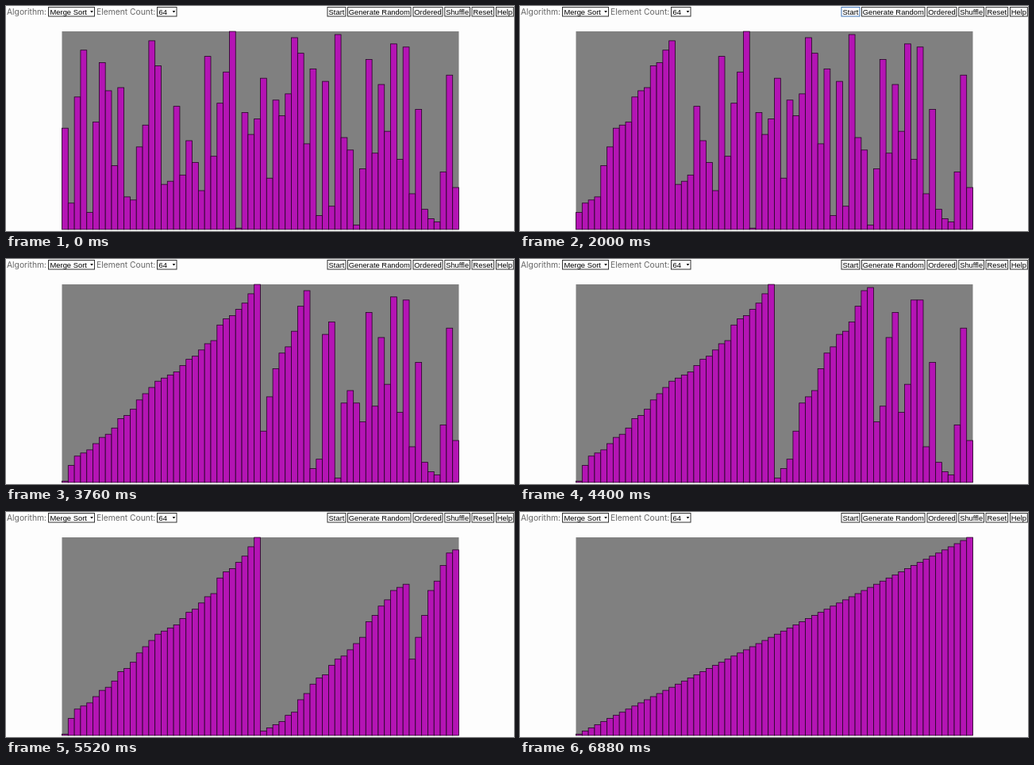
An HTML page that plays this animation: 640x284 px, repeating every 7920 ms.

```html
<!DOCTYPE html>
<html lang="en">
<head>
<meta charset="utf-8">
<title>Merge Sort</title>
<style>
html, body { margin: 0; width: 100%; height: 100%; overflow: hidden; background: #fdfdfd; }
svg { display: block; width: 640px; height: 284px; }
text { font: 9.4px "Liberation Sans", Arial, sans-serif; fill: #000; }
.label { font: 10.3px Inter, sans-serif; fill: #666; }
.box { fill: #fff; stroke: #333; stroke-width: 1; }
.focus { stroke: #3f74b8; }
#bars rect { fill: #b414b4; stroke: #240424; stroke-width: .8; }
</style>
</head>
<body>
<svg viewBox="0 0 640 284">
  <g id="header">
    <text class="label" x="1" y="10.5">Algorithm:</text>
    <text class="label" x="114" y="10.5">Element Count:</text>
  </g>
  <rect x="70.5" y="32" width="500" height="250" fill="#808080"/>
  <g id="bars"></g>
</svg>
<script>
const LOOP = 7920, FRAME = 80, BASE = 282, BAR = 500 / 64;
const values = [
  32, 8, 42, 57, 5, 34, 53, 44, 20, 45, 10, 9, 26, 33, 60, 52,
  14, 15, 39, 17, 28, 21, 12, 55, 23, 40, 50, 63, 0, 37, 30, 35,
  48, 16, 41, 36, 43, 61, 56, 27, 51, 4, 47, 7, 62, 29, 25, 1,
  19, 54, 24, 46, 31, 59, 22, 58, 11, 38, 6, 3, 2, 18, 49, 13];
// [time in ms, array writes done]
const pace = [[1120, 0], [2000, 72], [2480, 101], [3040, 146], [3760, 199],
  [4080, 217], [4240, 229], [5040, 281], [6000, 342], [6560, 384]];

const header = document.getElementById('header');
const barGroup = document.getElementById('bars');

function add(parent, tag, attrs, text = '') {
  const el = document.createElementNS('http://www.w3.org/2000/svg', tag);
  for (const key in attrs) el.setAttribute(key, attrs[key]);
  el.textContent = text;
  return parent.appendChild(el);
}

function box(left, right) {
  return add(header, 'rect', { class: 'box', x: left, y: 1.5, width: right - left, height: 11.5 });
}

function button(left, right, label) {
  const rect = box(left, right);
  add(header, 'text', { x: (left + right) / 2, y: 10.5, 'text-anchor': 'middle' }, label);
  return rect;
}

function select(left, right, label) {
  box(left, right);
  add(header, 'text', { x: left + 2, y: 10.5 }, label);
  add(header, 'path', { d: `M${right - 5.3} 6h3.6l-1.8 2.6z` });
}

select(53.5, 111.5, 'Merge Sort');
select(190.5, 215, '64');
const start = button(405, 428, 'Start');
button(430.5, 510, 'Generate Random');
button(513, 550, 'Ordered');
button(552.8, 584.5, 'Shuffle');
button(587, 614.7, 'Reset');
button(617.5, 639.3, 'Help');

const bars = values.map((_, i) => add(barGroup, 'rect', { x: 70.5 + i * BAR, width: BAR }));

// Sort a copy, logging every write
const writes = [];
function mergeSort(a, lo, hi) {
  if (hi - lo < 2) return;
  const mid = (lo + hi) / 2;
  mergeSort(a, lo, mid);
  mergeSort(a, mid, hi);
  const left = a.slice(lo, mid), right = a.slice(mid, hi);
  for (let k = lo; k < hi; k++) {
    const takeLeft = !right.length || left[0] < right[0];
    a[k] = (takeLeft ? left : right).shift();
    writes.push([k, a[k]]);
  }
}
mergeSort([...values], 0, values.length);

function writesAt(t) {
  if (t <= pace[0][0]) return 0;
  const i = pace.findIndex(p => p[0] >= t);
  if (i < 0) return writes.length;
  const [t0, n0] = pace[i - 1], [t1, n1] = pace[i];
  return Math.round(n0 + (n1 - n0) * (t - t0) / (t1 - t0));
}

function draw(now) {
  const t = Math.floor(now % LOOP / FRAME) * FRAME;
  const state = [...values];
  for (const [k, v] of writes.slice(0, writesAt(t))) state[k] = v;
  state.forEach((v, i) => {
    const top = 280.3 - v * 3.94;
    bars[i].setAttribute('y', top);
    bars[i].setAttribute('height', BASE - top);
  });
  start.classList.toggle('focus', t >= 640 && t < 2800);
}

const origin = performance.now();
function tick() {
  draw(performance.now() - origin);
  requestAnimationFrame(tick);
}
tick();
</script>
</body>
</html>
```
